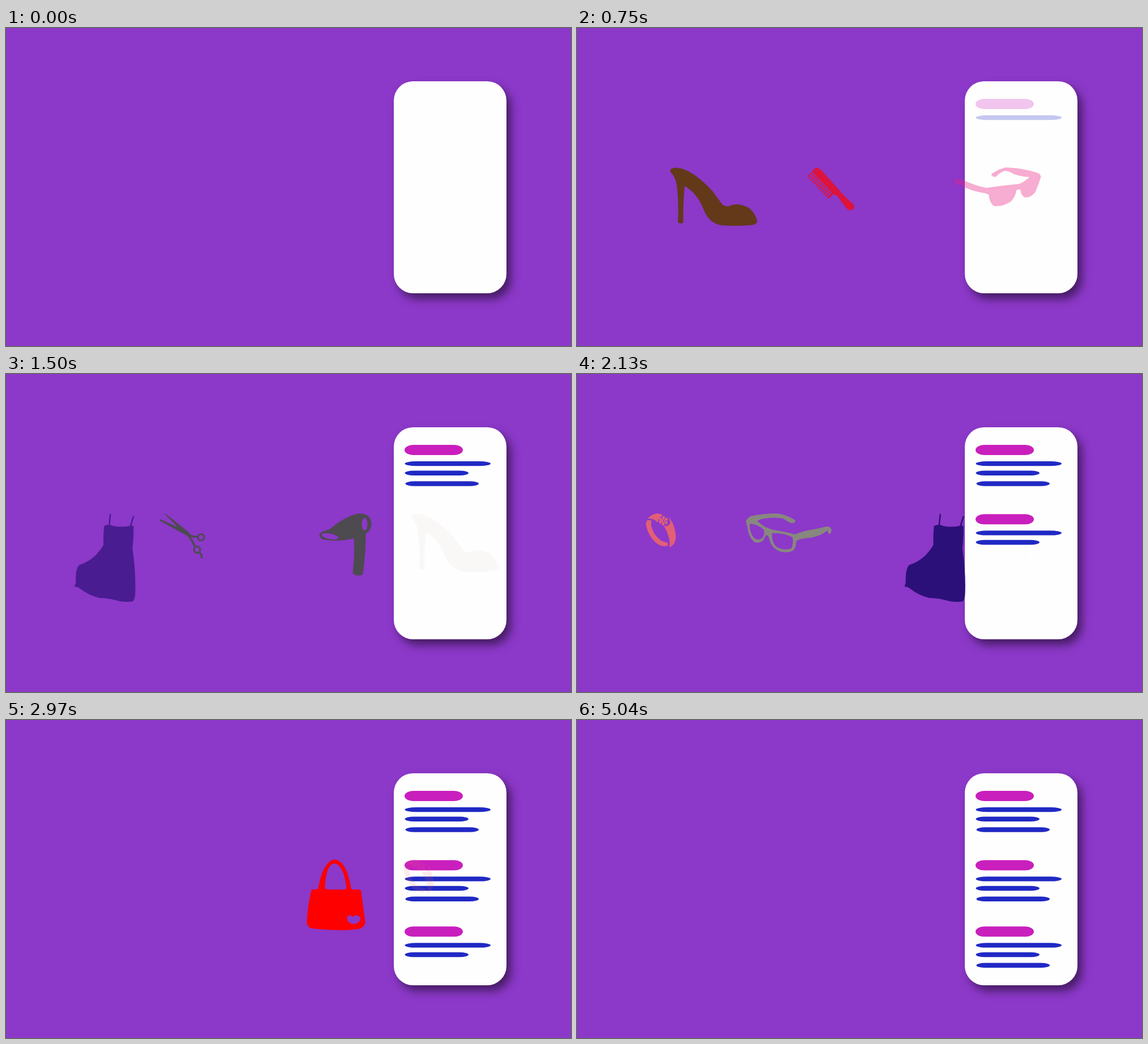
These frames come from a looping animation (998 px wide and 561 px high, 5100 ms). An HTML page:

```html
<!DOCTYPE html>
<html lang="en">
<head>
<meta charset="utf-8">
<title>Items into a list</title>
<style>
html, body { margin: 0; width: 100%; height: 100%; overflow: hidden; background: #8c38c9; }
.phone { position: absolute; left: 684.5px; top: 93.5px; width: 199.5px; height: 374px;
  border-radius: 34px; background: #fefefe; box-shadow: 8px 10px 16px rgba(0, 0, 0, .5); }
svg { position: absolute; left: 0; top: 0; }
</style>
</head>
<body>
<div class="phone"></div>
<svg id="stage" width="998" height="561" fill-rule="evenodd"></svg>
<script>
const LOOP = 5100, TRAVEL = 1000, START_X = 120, DISTANCE = 600, TOP = 246;
const stage = document.getElementById('stage');
const clamp = v => Math.max(0, Math.min(1, v));
const path = d => `<path d="${d}"/>`;
const stroke = (d, width, extra = '') =>
  `<path d="${d}" fill="none" stroke="currentColor" stroke-width="${width}" ${extra}/>`;

// Each item: start time, colour, drawing with its top left corner at 0,0.
const items = [
  // sunglasses
  [-40, '#ea2183', path('M0 23Q2 19 10 21L22 25Q40 33 57 36Q84 32 115 29Q126 24 133 17Q115 16 104 11Q96 6 89 6Q80 9 74 16Q70 18 66 14Q65 10 68 10Q80 2 91 0Q122 1 145 9Q153 11 153 17Q149 30 143 44Q134 54 125 53Q118 50 117 40Q114 37 110 40Q108 52 100 60Q86 70 70 68Q62 62 61 48Q56 45 46 44Q28 40 16 34Q9 27 6 29L4 33Q1 33 1 28Z')],
  // comb
  [265, '#dc143c', path('M16 0Q22 0 28 7L56 38Q64 49 82 64Q86 69 83 73Q78 77 74 75Q70 73 60 58Q53 46 46 48L39 55L37 53L45 44L10 7Z') +
    stroke('M6.5 11L42 49', 15, 'stroke-dasharray="2.2 2"')],
  // high heel
  [560, '#63391a', path('M0 5Q3 -1 16 1Q42 6 75 42Q85 56 92 65Q99 71 107 67Q122 61 140 72Q151 82 154 95Q153 102 140 102Q114 104 90 102Q68 98 59 74Q48 46 26 33Q23 50 23 96Q22 100 15 98Q13 98 14 92Q15 50 11 28Q8 14 1 9Z')],
  // hair dryer
  [866, '#4d4a50', path('M0 37Q2 32 18 28Q45 5 70 0Q92 0 92 19Q91 31 82 36Q82 70 77 107Q70 113 59 106Q63 70 61 44Q35 51 6 46Q0 42 0 37ZM75 19a5 11 0 1 0 10 0a5 11 0 1 0-10 0ZM4 36Q18 32 33 41Q36 45 27 46Q8 45 4 38Z')],
  // scissors
  [1153, '#4d4a50', path('M1 10L42 29L52 40L46 38L0 13Z') + path('M8 0L11 1L50 32L55 38L50 40L40 33Z') +
    stroke('M48 36Q56 42 67 41M48 36Q57 46 62 58M70 69Q75 73 74 79', 3.5) +
    stroke('M67.5 42a5.5 5.5 0 1 0 11 0a5.5 5.5 0 1 0-11 0M60.5 64a5.5 5.5 0 1 0 11 0a5.5 5.5 0 1 0-11 0', 3)],
  // dress
  [1467, '#2b1078', path('M52 22Q60 18 68 22Q82 25 97 22Q104 20 104 24Q104 45 102 62Q108 100 107 138Q107 150 103 155Q94 157 80 155Q60 149 43 149Q24 144 10 133Q4 128 1 130Q-1 129 2 122Q1 98 8 91Q36 82 51 55Q50 40 52 22Z') +
    stroke('M63 1L61 21M104 5L98 24', 2.5)],
  // glasses
  [1753, '#888780', path('M0 14Q2 8 8 5Q30 0 55 0Q72 2 87 12Q88 17 82 17Q75 16 66 9Q52 6 32 9Q25 10 20 13Q30 24 48 29Q70 32 86 37Q104 30 120 28L143 23Q151 23 151 30Q150 37 146 36Q145 30 142 31Q130 42 103 44Q92 46 89 49Q89 58 84 65Q74 71 60 67Q46 62 42 48Q40 38 36 38Q32 44 30 48Q23 54 14 50Q4 40 3 26ZM7 18Q5 30 14 43Q22 50 30 42Q34 36 31 28Q20 19 7 18ZM46 35Q45 50 54 59Q66 66 80 62Q85 52 82 42Q64 33 46 35Z')],
  // ring
  [2092, '#fb6a60', path('M3 12Q0 14 0 20Q4 40 18 52Q28 60 38 57Q40 54 37 51Q24 50 14 34Q7 20 10 13Q6 11 3 12Z') +
    path('M3 9Q10 1 20 0Q27 1 30 3Q22 7 21 16Q14 8 3 9Z') +
    path('M31 22Q39 24 43 17Q43 12 40 6Q52 20 53 42Q52 56 41 60Q44 50 39 38Q36 28 31 22Z') +
    stroke('M26.5 13a4.5 4.5 0 1 0 9 0a4.5 4.5 0 1 0-9 0', 7, 'stroke-dasharray="3.5 1.21"')],
  // handbag
  [2360, '#ff0000', path('M8 55Q8 52 13 53L20 52Q28 4 49 0Q70 2 78 50L80 53L92 53Q96 53 96 57Q100 85 103 110Q103 120 90 123Q60 127 12 122Q0 121 0 110Q1 85 8 55ZM32 50Q34 53 38 53L66 53Q70 53 70 49Q65 10 49 7Q34 8 32 50ZM71 103Q73 97 78 99Q82 103 84 99Q92 97 95 104Q94 113 82 114Q71 112 71 103Z')]
];

// Each bar of a section: x, y, width, height, corner radii, colour, number of its line.
const bars = [
  [704, 125, 103, 18, 15, 9, '#c91fbd', 0],
  [704.5, 154, 151.5, 8.3, 20, 4.2, '#2029c4', 0],
  [704.5, 170.5, 112.5, 8.5, 16, 4.2, '#2029c4', 1],
  [705.5, 189.3, 129.5, 8.5, 16, 4.2, '#2029c4', 2]
];
const sections = [0, 122.3, 239.3];

stage.innerHTML =
  sections.map((dy, s) => bars.map(([x, y, w, h, rx, ry, color, line]) =>
    `<rect class="bar" data-line="${s * 3 + line}" x="${x}" y="${y + dy}" width="${w}" height="${h}" rx="${rx}" ry="${ry}" fill="${color}"/>`
  ).join('')).join('') +
  items.map(([, color, art]) => `<g class="item" color="${color}" fill="currentColor">${art}</g>`).join('');
const barNodes = stage.querySelectorAll('.bar');
const itemNodes = stage.querySelectorAll('.item');

// cubic-bezier(.42, 0, .58, 1)
function easeInOut(t) {
  let lo = 0, hi = 1;
  for (let i = 0; i < 24; i++) {
    const s = (lo + hi) / 2, r = 1 - s;
    if (1.26 * s * r * r + 1.74 * s * s * r + s * s * s < t) lo = s; else hi = s;
  }
  return lo * lo * (3 - 2 * lo);
}

function draw(ms) {
  itemNodes.forEach((node, i) => {
    const t = clamp((ms - items[i][0]) / TRAVEL);
    const e = easeInOut(t);
    const alpha = ms < 30 ? 0 : Math.min(clamp(t / .05), clamp((1 - e) / .24));
    node.setAttribute('transform', `translate(${START_X + DISTANCE * e} ${TOP})`);
    node.setAttribute('opacity', t < 1 ? alpha : 0);
  });
  barNodes.forEach(node =>
    node.setAttribute('opacity', clamp((ms - 720 - 300 * node.dataset.line) / 120)));
}

const began = performance.now();
function tick() {
  draw((performance.now() - began) % LOOP);
  requestAnimationFrame(tick);
}
tick();
</script>
</body>
</html>
```
